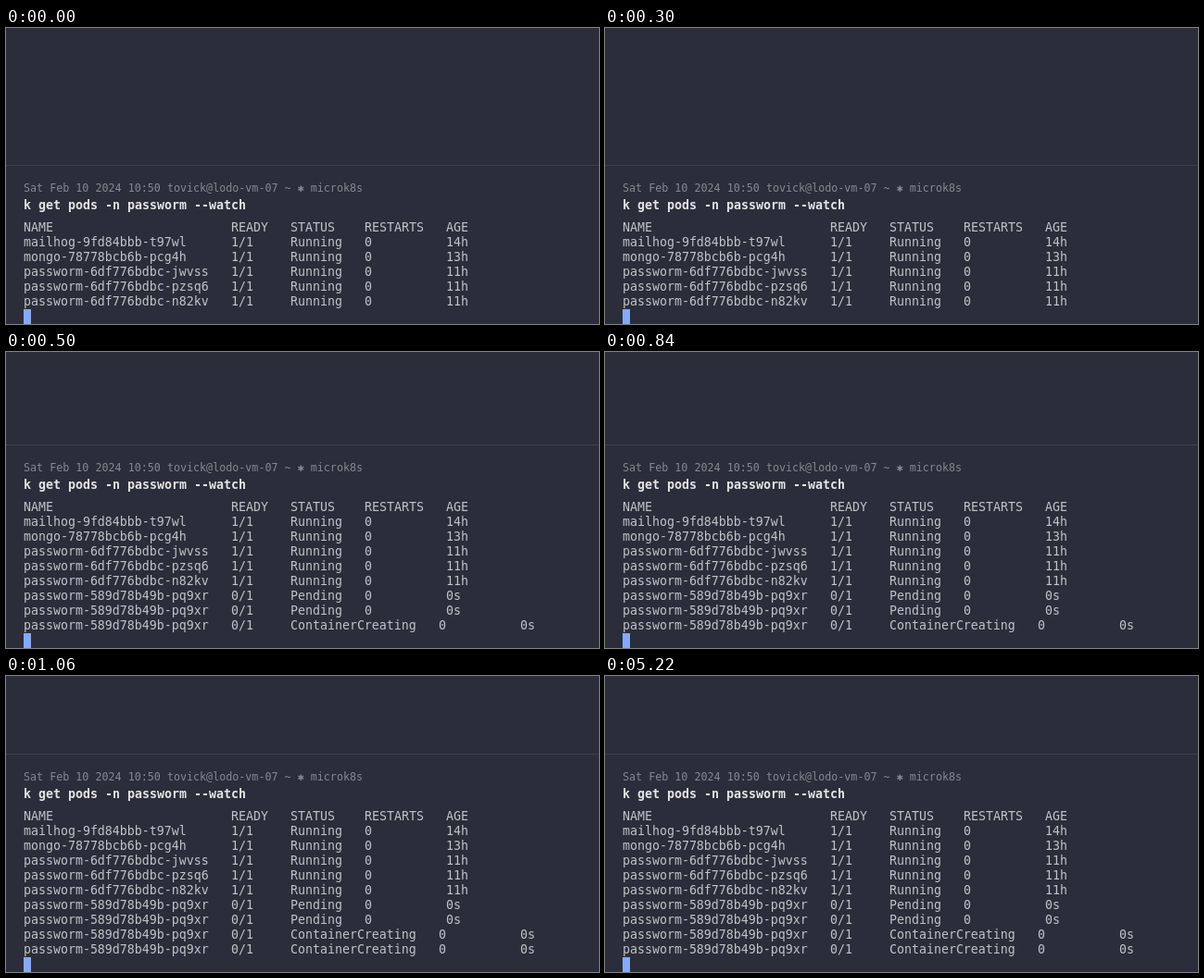
Write an HTML page with a canvas that moves like this. It is 640 by 320 pixels and loops after 8 s.

```html
<!DOCTYPE html>
<html lang="en">
<head>
<meta charset="utf-8">
<title>Watching pods</title>
<style>
  html, body { margin: 0; width: 100%; height: 100%; overflow: hidden; background: #2b2d3a; }
  canvas { display: block; width: 640px; height: 320px; }
</style>
</head>
<body>
<canvas id="stage" width="640" height="320"></canvas>
<script>
const ctx = document.getElementById('stage').getContext('2d');
const LOOP = 8000, LEFT = 19, ROW = 16, CELL = 8, BOTTOM = 304;
const MONO = '"DejaVu Sans Mono", "Liberation Mono", monospace';

const pod = (name, ready, status, restarts, age) =>
  name.padEnd(28) + ready.padEnd(8) +
  (status.length > 8 ? status.padEnd(20) : status.padEnd(10)) +
  restarts.padEnd(11) + age;

const running = (name, age) => pod(name, '1/1', 'Running', '0', age);
const fresh = status => pod('passworm-589d78b49b-pq9xr', '0/1', status, '0', '0s');

const rows = [
  'NAME'.padEnd(28) + 'READY'.padEnd(8) + 'STATUS'.padEnd(10) + 'RESTARTS'.padEnd(11) + 'AGE',
  running('mailhog-9fd84bbb-t97wl', '14h'),
  running('mongo-78778bcb6b-pcg4h', '13h'),
  running('passworm-6df776bdbc-jwvss', '11h'),
  running('passworm-6df776bdbc-pzsq6', '11h'),
  running('passworm-6df776bdbc-n82kv', '11h'),
  fresh('Pending'),
  fresh('Pending'),
  fresh('ContainerCreating'),
  fresh('ContainerCreating')
];

// Places every word on its terminal column.
function line(text, y, color, size, cell, weight = 'normal') {
  ctx.font = `${weight} ${size}px ${MONO}`;
  ctx.fillStyle = color;
  for (const word of text.matchAll(/\S+/g)) {
    ctx.fillText(word[0], LEFT + word.index * cell, y);
  }
}

function draw(time) {
  const count = time < 500 ? 6 : time < 1060 ? 9 : 10;
  const top = BOTTOM - count * ROW;

  ctx.fillStyle = '#2b2d3a';
  ctx.fillRect(0, 0, 640, 320);
  ctx.fillStyle = '#3e404d';
  ctx.fillRect(0, top - 60, 640, 1);

  line('Sat Feb 10 2024 10:50 tovick@lodo-vm-07 ~ ✱ microk8s', top - 31, '#868791', 11.69, 7.04);
  line('k get pods -n passworm --watch', top - 12, '#e4e4e7', 13.288, CELL, 'bold');
  rows.slice(0, count).forEach((row, i) =>
    line(row, top + 12 + i * ROW, '#c2c3c9', 13.288, CELL));

  ctx.fillStyle = '#86aaf9';
  ctx.fillRect(LEFT, BOTTOM, CELL, ROW);
}

const start = performance.now();
function tick() {
  draw((performance.now() - start) % LOOP);
  requestAnimationFrame(tick);
}
tick();
</script>
</body>
</html>
```
